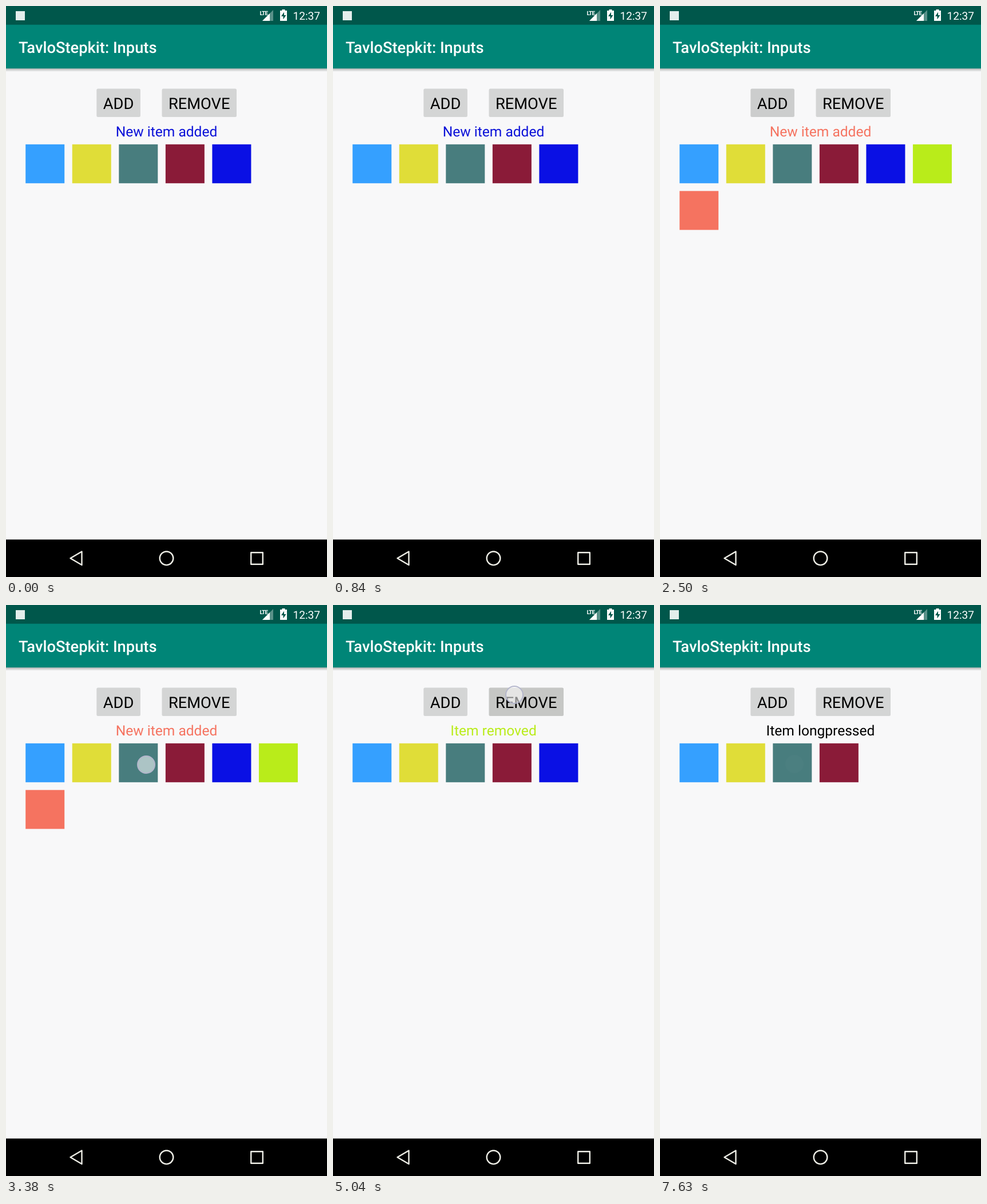
An HTML page that plays this animation: 561 by 998 pixels, repeating every 7670 ms.

```html
<!DOCTYPE html>
<html lang="en">
<head>
<meta charset="utf-8">
<title>Item events</title>
<style>
  html, body { margin: 0; width: 100%; height: 100%; overflow: hidden; background: #f8f8f9; }
  svg { display: block; width: 561px; height: 998px; font-family: Roboto, sans-serif; text-rendering: geometricPrecision; }
  .button rect { fill: #d4d5d5; }
  .button .shade, .button circle { fill: #1c1800; }
  .button text { font-size: 27.3px; text-anchor: middle; }
</style>
</head>
<body>
<svg viewBox="0 0 561 998">
  <defs>
    <linearGradient id="shadow" x2="0" y2="1">
      <stop stop-color="#000" stop-opacity=".28"/>
      <stop offset="1" stop-color="#000" stop-opacity="0"/>
    </linearGradient>
    <clipPath id="addClip"><rect x="158.300" y="144.500" width="76.600" height="49.500" rx="2.500"/></clipPath>
    <clipPath id="removeClip"><rect x="272.500" y="144.500" width="130.500" height="49.500" rx="2.500"/></clipPath>
  </defs>

  <rect width="561" height="998" fill="#f8f8f9"/>
  <rect y="109" width="561" height="6" fill="url(#shadow)"/>
  <rect width="561" height="109.200" fill="#008577"/>
  <rect width="561" height="32.700" fill="#00574b"/>

  <!-- status bar -->
  <rect x="17" y="9" width="16" height="16" fill="#e3eeec"/>
  <g fill="#fff">
    <text x="443.500" y="16" font-size="10" font-weight="700" font-stretch="75%" letter-spacing="-.8">LTE</text>
    <path d="M467 7V26H448Z" opacity=".35"/>
    <path d="M461 13V26H448Z"/>
    <path d="M482.500 6h5v2h3.500v18h-12V8h3.500z"/>
    <path d="M486 10.500l-5 7.500h3.500v5.500l5-7.500h-3.500z" fill="#00574b"/>
    <text x="501.500" y="24" font-size="19.1">12:37</text>
    <text x="22" y="81.500" font-size="27.3" font-weight="500">TavloStepkit: Inputs</text>
  </g>

  <g class="button" id="add" clip-path="url(#addClip)">
    <rect x="158" y="144" width="77" height="50"/>
    <rect class="shade" x="158" y="144" width="77" height="50" opacity="0"/>
    <circle opacity="0"/>
    <text x="196.500" y="179.800">ADD</text>
  </g>
  <g class="button" id="remove" clip-path="url(#removeClip)">
    <rect x="272" y="144" width="131" height="50"/>
    <rect class="shade" x="272" y="144" width="131" height="50" opacity="0"/>
    <circle opacity="0"/>
    <text x="337.700" y="179.800">REMOVE</text>
  </g>

  <text id="message" x="280.500" y="228" font-size="24.57" text-anchor="middle"></text>
  <g id="items"></g>
  <circle id="touch" r="15" fill="#fff" fill-opacity=".55" stroke="#b4b6cc" stroke-width="2" opacity="0"/>

  <!-- navigation bar -->
  <rect y="932.500" width="561" height="65.500" fill="#000"/>
  <g fill="none" stroke="#eeeee6" stroke-width="2.400" stroke-linejoin="round">
    <path d="M112.500 965.300L132.500 953.500V977Z"/>
    <circle cx="280.500" cy="965.300" r="11.800"/>
    <rect x="428.200" y="955.200" width="20.600" height="20.600"/>
  </g>
</svg>
<script>
  const LOOP = 7670;
  const COLORS = ['#35a0ff', '#e0dd38', '#487d7e', '#8a1b38', '#0a10e4', '#b9ec1a', '#f57360'];
  const $ = id => document.getElementById(id);

  // Each state holds from its time until the next one.
  const states = [
    { at: 0, count: 5, text: 'New item added', color: '#0a10d8' },
    { at: 1560, count: 6, text: 'New item added', color: COLORS[5] },
    { at: 2280, count: 7, text: 'New item added', color: COLORS[6] },
    { at: 3600, count: 7, text: 'Item longpressed', color: '#000' },
    { at: 4600, count: 6, text: 'Item removed', color: COLORS[6] },
    { at: 5000, count: 5, text: 'Item removed', color: COLORS[5] },
    { at: 5760, count: 4, text: 'Item removed', color: '#0a10d8' },
    { at: 7180, count: 4, text: 'Item longpressed', color: '#000' }
  ];

  const taps = [
    { from: 1450, to: 1550, x: 197, y: 165, button: 'add' },
    { from: 2170, to: 2270, x: 197, y: 165, button: 'add' },
    { from: 3100, to: 4110, x: 245, y: 279 },
    { from: 4490, to: 4590, x: 317, y: 157, button: 'remove' },
    { from: 4890, to: 5040, x: 317, y: 157, button: 'remove' },
    { from: 5650, to: 5750, x: 317, y: 157, button: 'remove' },
    { from: 6680, to: 7563, x: 235, y: 278 }
  ];

  const clamp = v => Math.max(0, Math.min(1, v));
  const pulse = (t, tap, rise, fall) =>
    Math.min(clamp((t - tap.from) / rise), clamp(1 - (t - tap.to) / fall));

  function set(el, attrs) {
    for (const key in attrs) el.setAttribute(key, attrs[key]);
  }

  const items = COLORS.map((fill, i) => {
    const el = document.createElementNS('http://www.w3.org/2000/svg', 'rect');
    set(el, { x: 34.2 + (i % 6) * 81.55, y: 241.8 + Math.floor(i / 6) * 81.55, width: 68, height: 68, fill });
    return $('items').appendChild(el);
  });

  function drawRipple(name, t) {
    const tap = taps.filter(p => p.button === name && p.from <= t).pop();
    const level = tap ? pulse(t, tap, 80, 480) : 0;
    set($(name).querySelector('.shade'), { opacity: 0.04 * level });
    const ring = $(name).querySelector('circle');
    set(ring, { opacity: 0.04 * level });
    if (tap) {
      const grow = 1 - (1 - clamp((t - tap.from) / 220)) ** 2;
      set(ring, { cx: tap.x, cy: tap.y, r: 15 + 90 * grow });
    }
  }

  function draw(t) {
    const state = states.filter(s => s.at <= t).pop();
    items.forEach((el, i) => set(el, { visibility: i < state.count ? 'visible' : 'hidden' }));
    $('message').textContent = state.text;
    set($('message'), { fill: state.color });

    drawRipple('add', t);
    drawRipple('remove', t);

    const tap = taps.filter(p => p.from <= t).pop();
    set($('touch'), tap
      ? { cx: tap.x, cy: tap.y, opacity: pulse(t, tap, 40, 70) }
      : { opacity: 0 });
  }

  const start = performance.now();
  function tick() {
    draw((performance.now() - start) % LOOP);
    requestAnimationFrame(tick);
  }
  tick();
</script>
</body>
</html>
```
